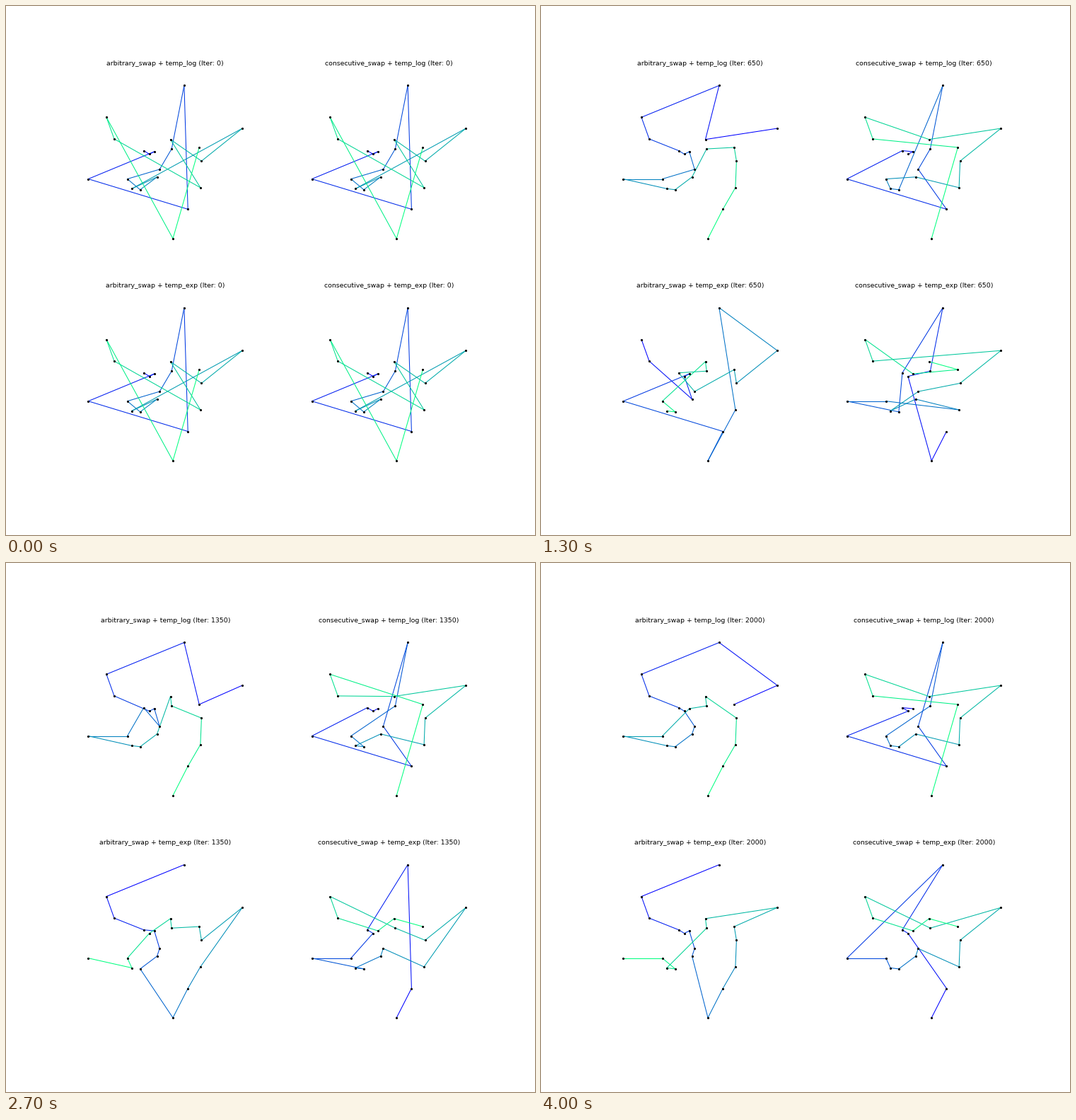
A matplotlib script for the animation above (4.1 s loop, 748 by 748 pixels).

```python
import matplotlib.pyplot as plt
from matplotlib.animation import FuncAnimation
from matplotlib.collections import LineCollection
import numpy as np

plt.rcParams["font.family"] = "DejaVu Sans"

FRAMES, INTERVAL, ITERS_PER_FRAME = 41, 100, 50

# City positions, lettered A to T, in pixels of the top left panel.
CITIES = np.array([
    (251.9, 112.5), (142.0, 157.4), (153.0, 188.0), (194.7, 204.6),
    (202.7, 209.5), (209.7, 206.0), (232.5, 188.7), (234.2, 202.1),
    (273.2, 200.0), (334.1, 173.1), (276.4, 219.3), (217.2, 231.0),
    (213.6, 241.8), (171.6, 244.6), (116.4, 244.6), (177.9, 258.4),
    (189.7, 259.8), (274.9, 256.9), (257.2, 287.4), (236.0, 328.9),
])

START = "DEFOSAHLNQMPJKGRCBTI"
KEY_FRAMES = [0, 5, 13, 19, 24, 31, 40]

# Tours that each search passes through at the key frames.
SEARCHES = {
    "arbitrary_swap + temp_log": [
        START, "HDCBAJGFEONPMRKILQST", "JGABCDEFLNOPQMHIKRST",
        "JIABCDFELMONQPHGKRST", "JIABCDFELNOPQMGHKRST",
        "JIABCEFLMNQPODGHKRST", "IJABCDELMQPONFHGKRST"],
    "consecutive_swap + temp_log": [
        START, "FEDOSLHANPQMRKJGBCIT", "EFDOSLHAQPNMRKJGBCIT",
        "FEDOSLAHQPNMRKJGBCIT", "FDEOSLHANQPMRKJGCBIT",
        "FEDOSLAHNPQMRKJGBCIT", "FDEOSLAHNPQMRKJGBCIT"],
    "arbitrary_swap + temp_exp": [
        START, "HDMKJIAGQPLECBFNTSRO", "BCMEFOSTRAJKILDHGNQP",
        "ABCPMLEQSRTJIHKGDFNO", "ABCFELMQTSRJKIHGDNPO",
        "ABCDFENQTSRKJIHGLMPO", "ABCDEFLMTSRKIJGHPQNO"],
    "consecutive_swap + temp_exp": [
        START, "TSDEHAONPQMLRKJGCBFI", "STEHADQONRMPLKJCBFIG",
        "TSADENOQPMLHKRJBCFGI", "TSADEONPQMLRJKHBCFGI",
        "TSADENOQPMLRKJHCBFGI", "TSEDAONPQMLRKJHBCFGI"],
}


def swap_steps(a, b, adjacent):
    """All tours met while swapping cities to turn tour a into tour b."""
    tour, steps = list(a), [a]
    for i, city in enumerate(b):
        j = tour.index(city)
        while j > i:
            k = j - 1 if adjacent else i
            tour[j], tour[k] = tour[k], tour[j]
            steps.append("".join(tour))
            j = k
    return steps


def tours_by_frame(name, keys):
    adjacent = name.startswith("consecutive")
    tours = [keys[0]]
    spans = zip(KEY_FRAMES, KEY_FRAMES[1:], keys, keys[1:])
    for f0, f1, a, b in spans:
        steps = swap_steps(a, b, adjacent)
        for f in range(f0 + 1, f1 + 1):
            t = (f - f0) / (f1 - f0)
            tours.append(steps[round(t * (len(steps) - 1))])
    return tours


def segments(tour):
    path = CITIES[[ord(c) - ord("A") for c in tour]]
    return np.stack([path[:-1], path[1:]], axis=1)


fig, axes = plt.subplots(2, 2, figsize=(10, 10), dpi=74.8)
fig.subplots_adjust(left=0.125, right=0.9, bottom=0.11, top=0.88,
                    wspace=0.2, hspace=0.2)
colors = plt.get_cmap("winter")(np.linspace(0, 1, len(CITIES) - 1))

panels = []
for ax, (name, keys) in zip(axes.flat, SEARCHES.items()):
    ax.set_xlim(93.5, 357.0)
    ax.set_ylim(351.6, 89.8)
    ax.axis("off")
    lines = LineCollection([], colors=colors, linewidths=1, capstyle="projecting")
    ax.add_collection(lines, autolim=False)
    ax.plot(*CITIES.T, "k.", ms=4, zorder=3)
    title = ax.set_title("", fontsize=9)
    panels.append((name, lines, title, tours_by_frame(name, keys)))


def draw(frame):
    for name, lines, title, tours in panels:
        lines.set_segments(segments(tours[frame]))
        title.set_text(f"{name} (Iter: {frame * ITERS_PER_FRAME})")
    return []


anim = FuncAnimation(fig, draw, frames=FRAMES, interval=INTERVAL,
                     repeat=True, repeat_delay=0, blit=False)
plt.show()
```
